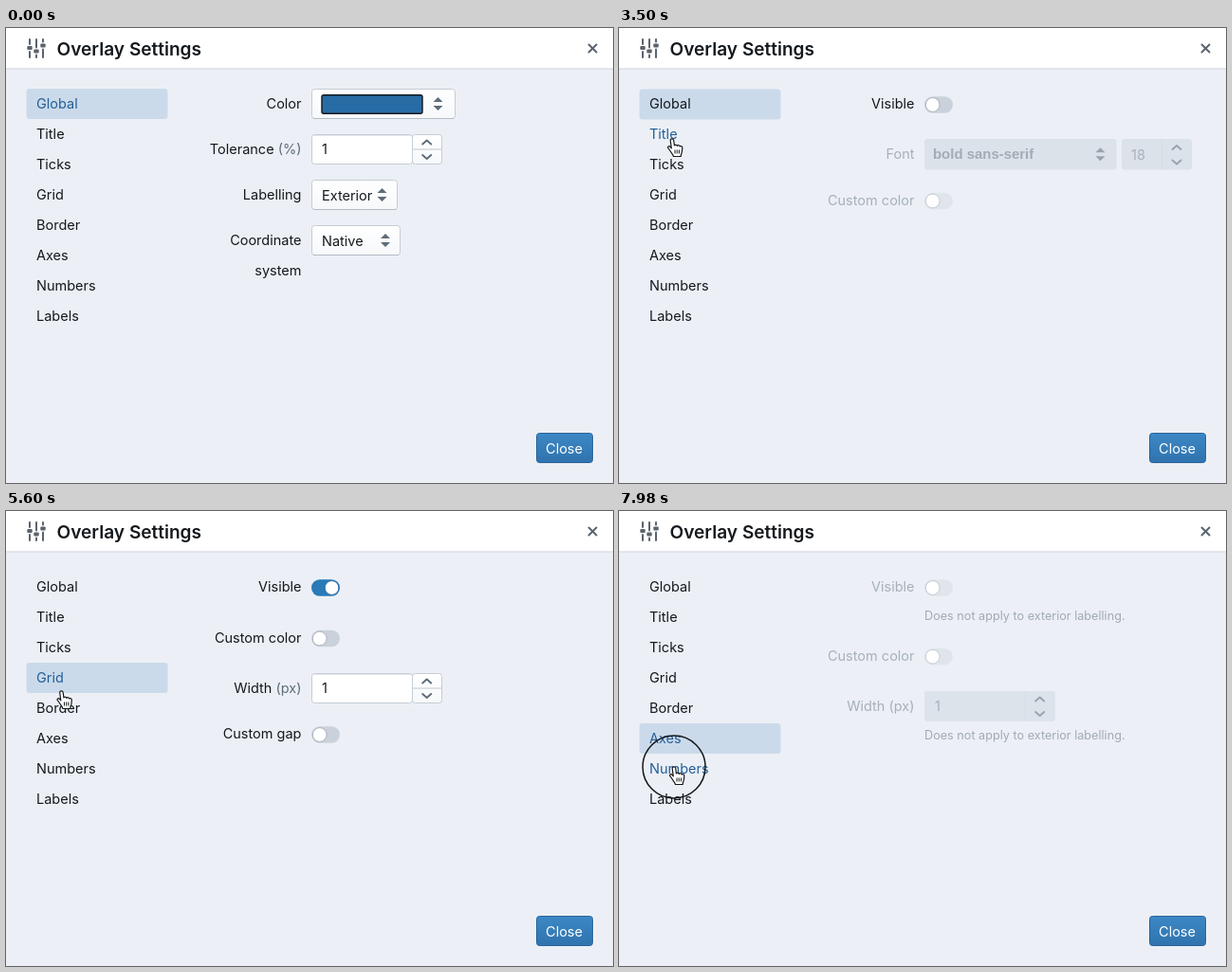
An HTML page that plays this animation: 640x480 px, repeating every 8000 ms.

```html
<!DOCTYPE html>
<html lang="en">
<head>
<meta charset="utf-8">
<title>Overlay Settings</title>
<style>
  html, body { margin: 0; width: 100%; height: 100%; overflow: hidden; background: #ecf0f6; }
  svg { display: block; width: 100%; height: 100%; }
  text { font: 14.5px Inter, "Open Sans", sans-serif; fill: #14191e; }
  .end { text-anchor: end; }
  .unit { fill: #5f6c79; }
  .off, .off .unit { fill: #a7afb9; }
  .hint { font-size: 12.66px; fill: #a1a9b3; }
  .font { font: bold 14.95px "Liberation Sans", Arial, sans-serif; fill: #a3abb4; }
  .head { font-size: 19.1px; font-weight: 600; }
  .tab.on { fill: #235f97; }
</style>
</head>
<body>
<svg id="stage" viewBox="0 0 640 480" preserveAspectRatio="none"></svg>
<script>
const LOOP = 8000;
const TABS = ['Global', 'Title', 'Ticks', 'Grid', 'Border', 'Axes', 'Numbers', 'Labels'];
const ROW = 32, TOP = 64;

// Time at which each tab's panel opens
const CLICKS = [[3390, 1], [4440, 2], [5180, 3], [6160, 4], [6960, 5], [8050, 6]];
const PRESS = 95, LAG = 110, SLIDE = 200;

// Pointer path: time, x, y of the fingertip
const APPEAR = 1750;
const PATH = [
  [1750, 104, 124], [2120, 66, 81], [2590, 66, 81], [3080, 56, 117],
  [3780, 56, 117], [4240, 60, 144], [4640, 60, 144], [4980, 60, 174],
  [5300, 60, 174], [5600, 58.5, 190], [5900, 58, 207], [6270, 58, 207],
  [6570, 57, 238], [7120, 57, 238], [7700, 58, 270], [8000, 58, 270]
];

const text = (x, y, str, cls = '') => `<text x="${x}" y="${y}" class="${cls}">${str}</text>`;

const rect = (x, y, w, h, fill, stroke = 'none', r = 3) =>
  `<rect x="${x}" y="${y}" width="${w}" height="${h}" rx="${r}" fill="${fill}" stroke="${stroke}"/>`;

const label = (y, str, unit = '', off = false) =>
  text(311.5, y, str + (unit && ` <tspan class="unit">(${unit})</tspan>`), 'end' + (off ? ' off' : ''));

const carets = (x, y, off) =>
  `<path d="M${x - 5} ${y - 2}l5 -5 5 5zM${x - 5} ${y + 2}l5 5 5 -5z" stroke-width="1"
    stroke-linejoin="round" fill="${off ? '#98a3af' : '#5f6b78'}"/>`;

const chevrons = (x, y, off) =>
  `<path d="M${x - 4.5} ${y - 5.5}l4.5 -4 4.5 4M${x - 4.5} ${y + 6}l4.5 4 4.5 -4" fill="none"
    stroke="${off ? '#98a3af' : '#5f6b78'}" stroke-width="1.9" stroke-linecap="round" stroke-linejoin="round"/>`;

function toggle(cy, state) {
  const track = { on: '#2a7ab8', off: '#cbd1db', disabled: '#e0e5ec' }[state];
  const rim = { on: '#2569a0', off: '#aab2bd', disabled: '#c3cad3' }[state];
  const cx = state === 'on' ? 343.5 : 330.7;
  return rect(322, cy - 8.7, 30, 17.4, track, 'none', 8.7) +
    `<circle cx="${cx}" cy="${cy}" r="7.4" fill="#fff" stroke="${rim}"/>`;
}

function select(y, w, str, caretX) {
  return rect(322.5, y + .5, w - 1, 31, 'url(#button)', '#c5ccd4') +
    `<path d="M324 ${y + 31.5}h${w - 4}" stroke="#b3bbc4"/>` +
    text(333, y + 22, str) + carets(caretX, y + 16);
}

function number(y, off) {
  if (off) {
    return rect(322, y, 138, 32, '#dde3ea') +
      `<path d="M428.5 ${y}v32" stroke="#d7dee6"/>` +
      text(333, y + 21.3, '1', 'off') + chevrons(443.7, y + 16, true);
  }
  return rect(322.5, y + .5, 106, 31, '#fff', '#c5ccd4') +
    `<path d="M324 ${y + 1.5}h103" stroke="#e3e7ec"/>` +
    rect(428.5, y + .5, 31, 31, 'url(#button)', '#c5ccd4') +
    `<path d="M428.5 ${y + 16}h31" stroke="#c1c8d0"/>` +
    text(333, y + 21.3, '1') + chevrons(443.7, y + 16);
}

const globalPanel =
  label(85.2, 'Color') + rect(322.5, 64.5, 151, 31, 'url(#button)', '#c5ccd4') +
  '<path d="M324 95.5h148" stroke="#b3bbc4"/>' +
  '<rect x="333" y="70.7" width="106" height="19.6" rx="2" fill="#286ca5" stroke="#10161c" stroke-width="1.4"/>' +
  carets(455.5, 80) +
  label(133.2, 'Tolerance', '%') + number(112) +
  label(181.2, 'Labelling') + select(160, 91, 'Exterior', 396.5) +
  label(229.2, 'Coordinate') + label(261.2, 'system') + select(208, 94, 'Native', 400);

const titlePanel =
  label(85.2, 'Visible') + toggle(81, 'off') +
  label(138.3, 'Font', '', true) + rect(322, 117, 202.5, 32.5, '#dce2ea') +
  text(331, 137.5, 'bold sans-serif', 'font') + carets(507.5, 133.3, true) +
  rect(530, 117, 74, 32.5, '#dce2ea') + '<path d="M572.5 117v32.5" stroke="#d5dce4"/>' +
  text(540, 138.5, '18', 'off') + chevrons(588, 133.5, true) +
  label(187, 'Custom color', '', true) + toggle(182.5, 'disabled');

const linePanel =
  label(85.2, 'Visible') + toggle(81, 'on') +
  label(138.6, 'Custom color') + toggle(134.5, 'off') +
  label(192, 'Width', 'px') + number(171);

const gridPanel = linePanel + label(240, 'Custom gap') + toggle(236, 'off');

const HINT = 'Does not apply to exterior labelling.';
const axesPanel =
  label(85.2, 'Visible', '', true) + toggle(81, 'disabled') + text(322, 115.3, HINT, 'hint') +
  label(158, 'Custom color', '', true) + toggle(153.7, 'disabled') +
  label(211.2, 'Width', 'px', true) + number(190, true) + text(322, 241.3, HINT, 'hint');

const PANELS = [globalPanel, titlePanel, linePanel, gridPanel, linePanel, axesPanel];

// One slider of the header icon: bar split around its handle
const slider = (x, y) =>
  rect(x - 1, 11, 2, y - 12, '#5b636d', 'none', 1) +
  rect(x - 2.7, y, 5.4, 4, '#5b636d', 'none', 1) +
  rect(x - 1, y + 5, 2, 27 - y, '#5b636d', 'none', 1);

const gradient = (id, from, to) =>
  `<linearGradient id="${id}" x2="0" y2="1"><stop stop-color="${from}"/><stop offset="1" stop-color="${to}"/></linearGradient>`;

const stage = document.getElementById('stage');
stage.innerHTML = `
  <defs>${gradient('button', '#ffffff', '#f6f8fa')}${gradient('primary', '#3c88c5', '#2f73ae')}</defs>
  <rect width="640" height="480" fill="#ecf0f6"/>
  <rect width="640" height="42.5" fill="#fff"/>
  <path d="M0 43h640" stroke="#d3d8df"/>
  ${slider(25, 19)}${slider(32, 22.5)}${slider(39, 16.5)}
  ${text(53.5, 28.6, 'Overlay Settings', 'head')}
  <path d="M614.5 17.5l8 8m0 -8l-8 8" stroke="#5b6570" stroke-width="2" stroke-linecap="round"/>
  <rect id="marker" x="21.5" width="149" height="32" rx="3" fill="#cbdaea"/>
  ${TABS.map((name, i) => text(32, TOP + 21.2 + ROW * i, name, 'tab')).join('')}
  ${PANELS.map(p => `<g class="panel">${p}</g>`).join('')}
  ${rect(559.5, 427.5, 59, 31, 'url(#primary)', '#2b639a')}
  <text x="588.5" y="448.8" text-anchor="middle" style="fill:#fff">Close</text>
  <g id="pointer">
    <circle id="ring" r="33" fill="none" stroke="#14171a" stroke-width="1.5"/>
    <path d="M-1.8 1.5C-1.8 -.6 1.4 -.6 1.7 1.5L2.4 7C3 5.8 5 6 5.3 7.4C6 6.3 8 6.6 8.2 8
      C9.2 7.2 10.8 7.8 10.8 9.4L10.5 13C10.3 15 9.2 16 9.2 18.5L1.4 18.5C1.2 16.5 -1.2 14.5 -2.4 12
      L-4.4 9.4C-4.8 7.6 -3 7.2 -2 8.4L-.7 9.8Z" fill="#fff" stroke="#15181b" stroke-width="1.2" stroke-linejoin="round"/>
    <path d="M3 11.5v4M5.2 11.5v4M7.4 11.5v4" stroke="#15181b" stroke-width="1"/>
  </g>`;

const marker = document.getElementById('marker');
const pointer = document.getElementById('pointer');
const ring = document.getElementById('ring');
const tabs = [...stage.querySelectorAll('.tab')];
const panels = [...stage.querySelectorAll('.panel')];

const clamp = v => Math.min(1, Math.max(0, v));
const smooth = p => p * p * (3 - 2 * p);
const easeOut = p => 1 - (1 - p) ** 2.5;
const show = (el, on) => el.setAttribute('display', on ? 'inline' : 'none');

function pointerAt(t) {
  const i = Math.max(1, PATH.findIndex(k => k[0] >= t));
  const [t0, x0, y0] = PATH[i - 1], [t1, x1, y1] = PATH[i];
  const p = smooth(clamp((t - t0) / (t1 - t0)));
  return [x0 + (x1 - x0) * p, y0 + (y1 - y0) * p];
}

function draw(t) {
  let current = 0, row = 0, pressed = false;
  for (const [at, tab] of CLICKS) {
    if (t >= at) current = tab;
    if (t >= at - PRESS && t < at) pressed = true;
    row += (tab - row) * easeOut(clamp((t - at - LAG) / SLIDE));
  }
  const [x, y] = pointerAt(t);
  const visible = t >= APPEAR;
  const hovered = visible && x < 171 ? Math.floor((y - TOP) / ROW) : -1;

  marker.setAttribute('y', TOP + ROW * row);
  tabs.forEach((el, i) => el.classList.toggle('on', i === current || i === hovered));
  panels.forEach((el, i) => show(el, i === current));
  pointer.setAttribute('transform', `translate(${x} ${y})`);
  show(pointer, visible);
  show(ring, pressed);
}

const start = performance.now();
function tick() {
  draw((performance.now() - start) % LOOP);
  requestAnimationFrame(tick);
}
tick();
</script>
</body>
</html>
```
